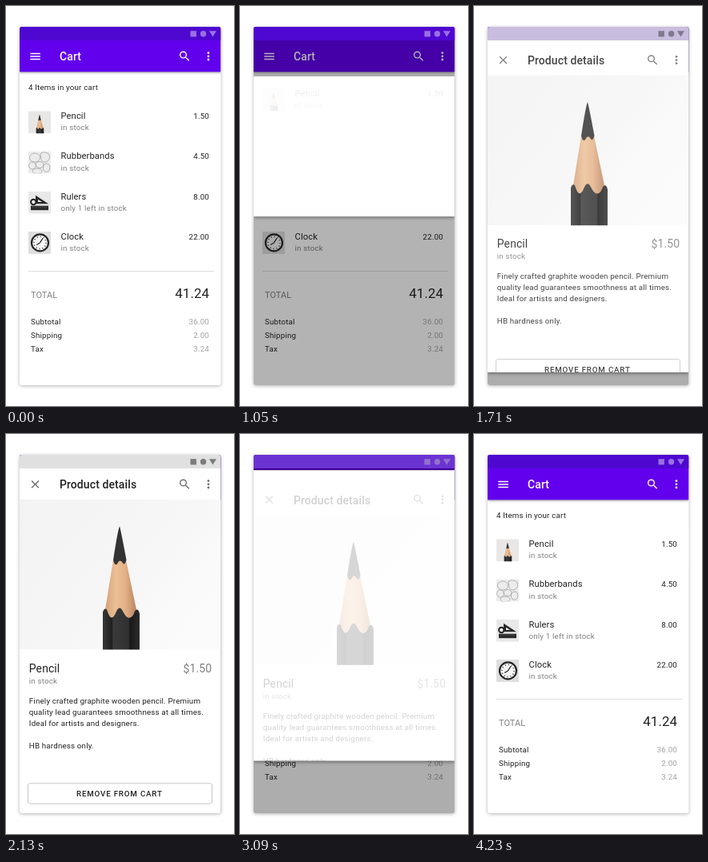
Animation, 285 px wide and 500 px high, one loop 4860 ms. Source, as an HTML page:

```html
<!DOCTYPE html>
<html lang="en">
<head>
<meta charset="utf-8">
<title>Cart</title>
<style>
  html, body { margin: 0; width: 100%; height: 100%; overflow: hidden; background: #fff; }
  svg { display: block; width: 285px; height: 500px; }
  text { font: 9.78px Roboto, sans-serif; letter-spacing: .175px; fill: #222; }
  .bar { font-size: 13.97px; font-weight: 500; letter-spacing: .105px; }
  .name { font-size: 11.18px; letter-spacing: .105px; }
  .big { font-size: 13.97px; letter-spacing: .1px; }
  .sum { font-size: 16.9px; letter-spacing: .1px; }
  .total { font-size: 11px; letter-spacing: 0; }
  .button { font-weight: 500; letter-spacing: .8px; }
  .soft { fill: #808080; }
  .pale { fill: #a3a3a3; }
  .white { fill: #fff; }
  .end { text-anchor: end; }
  #card { filter: drop-shadow(0 1.5px 2px rgba(0, 0, 0, .3)); }
  #header { filter: drop-shadow(0 1.5px 1.5px rgba(0, 0, 0, .4)); }
</style>
</head>
<body>
<svg viewBox="0 0 285 500">
  <defs>
    <clipPath id="cardClip"><rect x="17" y="26" width="251.5" height="448" rx="3"/></clipPath>
    <clipPath id="sheetClip"><rect class="sheet" x="17" width="251.5"/></clipPath>
    <clipPath id="thumbClip"><rect width="28" height="28"/></clipPath>
    <linearGradient id="paper" x2="1" y2=".6">
      <stop stop-color="#f3f3f3"/><stop offset=".6" stop-color="#f6f6f6"/><stop offset="1" stop-color="#fbfbfb"/>
    </linearGradient>
    <linearGradient id="wood">
      <stop stop-color="#d6a27a"/><stop offset=".35" stop-color="#ecc096"/>
      <stop offset=".65" stop-color="#e3b086"/><stop offset="1" stop-color="#b98462"/>
    </linearGradient>
    <linearGradient id="paint">
      <stop stop-color="#383838"/><stop offset=".25" stop-color="#1f1f1f"/><stop offset=".28" stop-color="#3a3a3a"/>
      <stop offset=".7" stop-color="#303030"/><stop offset=".74" stop-color="#181818"/><stop offset="1" stop-color="#2c2c2c"/>
    </linearGradient>

    <path id="menu" d="M3 18h18v-2H3zm0-5h18v-2H3zm0-7v2h18V6z"/>
    <path id="close" d="M19 6.41 17.59 5 12 10.59 6.41 5 5 6.41 10.59 12 5 17.59 6.41 19 12 13.41 17.59 19 19 17.59 13.41 12z"/>
    <path id="search" d="M15.5 14h-.79l-.28-.27A6.47 6.47 0 0 0 16 9.5 6.5 6.5 0 1 0 9.5 16c1.61 0 3.09-.59 4.23-1.57l.27.28v.79l5 4.99L20.49 19zm-6 0a4.5 4.5 0 1 1 0-9 4.5 4.5 0 0 1 0 9z"/>
    <g id="more"><circle cx="12" cy="6" r="2"/><circle cx="12" cy="12" r="2"/><circle cx="12" cy="18" r="2"/></g>
    <g id="tools">
      <use href="#search" transform="translate(214.9 54.4) scale(.699)"/>
      <use href="#more" transform="translate(244.6 54.4) scale(.699)"/>
    </g>
    <g id="signals">
      <rect x="230.5" y="31.2" width="7.4" height="7.2"/>
      <circle cx="246.6" cy="34.8" r="3.7"/>
      <path d="M254 31.2h9l-4.5 7.2z"/>
    </g>

    <!-- Pencil with its tip at the origin -->
    <g id="pencil">
      <path fill="url(#wood)" d="M-8 42Q0 34 8 42L21 104V116H-18V104z"/>
      <path fill="#333" d="M0 0Q1 2 8.5 42Q6 50 3.5 45Q0 40-3 47Q-6 50-8 42Q-2 3 0 0z"/>
      <path fill="url(#paint)" d="M-21 154V107Q-19 101-16 104Q-13 114-10 114Q-7 114-4 106Q0 98 4 106Q9 116 13 114Q17 113 19 106Q23 101 25 109V154z"/>
    </g>

    <g id="pencilThumb">
      <rect width="28" height="28" fill="#e9e7e5"/>
      <use href="#pencil" transform="translate(14 4.5) scale(.21 .158)"/>
    </g>
    <g id="bandsThumb">
      <rect width="28" height="28" fill="#ececec"/>
      <g fill="none" stroke="#a2a2a2" stroke-width=".8">
        <ellipse cx="8" cy="8" rx="6.5" ry="5.5"/>
        <path d="M15 3Q20-1 26 4Q28 10 23 13Q18 15 16 10z"/>
        <circle cx="5" cy="18" r="4.5"/>
        <ellipse cx="14" cy="17" rx="5" ry="4"/>
        <path d="M19 17Q26 13 27 20Q26 28 20 25Q17 22 19 17z"/>
        <ellipse cx="11" cy="25" rx="6" ry="3.5"/>
      </g>
    </g>
    <g id="rulersThumb">
      <rect width="28" height="28" fill="#e8e8e8"/>
      <path fill="#262626" fill-rule="evenodd" d="M9 5L25 15.5H9zM12 10V13.3H17.2z"/>
      <rect x="3" y="18" width="22" height="5.5" fill="#2b2b2b"/>
      <circle cx="6.3" cy="13.3" r="3.2" fill="#e8e8e8" stroke="#222" stroke-width="2"/>
      <path d="M5 19.5h18" stroke="#888" stroke-width=".7" stroke-dasharray=".7 1"/>
    </g>
    <g id="clockThumb">
      <rect width="28" height="28" fill="#dedede"/>
      <circle cx="14.5" cy="14" r="10.5" fill="#f4f4f4" stroke="#262626" stroke-width="2.2"/>
      <circle cx="14.5" cy="14" r="7.6" fill="none" stroke="#333" stroke-width="1.8" stroke-dasharray=".9 3.08"/>
      <path d="M14.5 14L18 8.3M14.5 14L10.2 16.6" stroke="#222" stroke-width="1.2"/>
    </g>
  </defs>

  <g id="card">
    <rect x="17" y="26" width="251.5" height="448" rx="3" fill="#fff"/>
  </g>
  <g clip-path="url(#cardClip)">
    <g id="list">
      <rect id="header" x="17" y="26" width="251.5" height="56.3" fill="#6200ee"/>
      <g class="white">
        <use href="#menu" transform="translate(28.2 54.6) scale(.699)"/>
        <use href="#tools"/>
      </g>
      <text class="bar white" x="67" y="68.4">Cart</text>
      <text x="28" y="104.7">4 Items in your cart</text>
      <g id="rows"></g>
      <path d="M28 331.5H260" stroke="#dcdcdc"/>
      <text class="total soft" x="31" y="364.6">TOTAL</text>
      <text class="sum end" x="254.2" y="364.8">41.24</text>
      <g id="costs"></g>
    </g>
    <rect id="scrim" x="17" y="26" width="251.5" height="448" opacity="0"/>

    <rect id="panel" class="sheet" x="17" width="251.5" fill="#fff"/>
    <g clip-path="url(#sheetClip)">
      <g id="item"></g>
      <g id="detail" opacity="0">
        <g fill="#6c6c6c">
          <use href="#close" transform="translate(28.1 54.5) scale(.699)"/>
          <use href="#tools"/>
        </g>
        <text class="bar" x="67" y="68.4">Product details</text>
        <rect x="17" y="82" width="251.5" height="187.3" fill="url(#paper)"/>
        <use href="#pencil" transform="translate(142 115.5)"/>
        <text class="big" x="28.8" y="297.6">Pencil</text>
        <text class="big soft end" x="257.2" y="297.6">$1.50</text>
        <text class="soft" x="28.8" y="311.6">in stock</text>
        <g id="story"></g>
        <rect x="27.5" y="436.8" width="230" height="25.4" rx="2.5" fill="#fff" stroke="#c6c6c6"/>
        <text class="button" x="88" y="453.3">REMOVE FROM CART</text>
      </g>
    </g>

    <rect x="17" y="26" width="251.5" height="17" fill="#4f08d0"/>
    <use href="#signals" fill="#fff" opacity=".42"/>
    <g id="status" opacity="0">
      <rect x="17" y="26" width="251.5" height="17" fill="#e0e0e0"/>
      <use href="#signals" fill="#7b7b7b"/>
    </g>
  </g>
</svg>
<script>
const $ = id => document.getElementById(id);
const label = (x, y, s, cls = '') => `<text class="${cls}" x="${x}" y="${y}">${s}</text>`;

const items = [
  ['Pencil', 'in stock', '1.50', 'pencil'],
  ['Rubberbands', 'in stock', '4.50', 'bands'],
  ['Rulers', 'only 1 left in stock', '8.00', 'rulers'],
  ['Clock', 'in stock', '22.00', 'clock']
];
const row = ([name, stock, price, art], i) => {
  const y = 116 + i * 50.2;
  return `<g transform="translate(28 ${y + 15.3})" clip-path="url(#thumbClip)"><use href="#${art}Thumb"/></g>` +
    label(68.5, y + 25.2, name, 'name') +
    label(68.5, y + 39.3, stock, 'soft') +
    label(254, y + 25.2, price, 'end');
};
$('rows').innerHTML = items.map(row).join('');
$('item').innerHTML = row(items[0], 0);

$('costs').innerHTML = [['Subtotal', '36.00'], ['Shipping', '2.00'], ['Tax', '3.24']]
  .map(([name, cost], i) => label(31, 398.2 + i * 16.8, name) + label(254, 398.2 + i * 16.8, cost, 'end pale'))
  .join('');

$('story').innerHTML = [
  'Finely crafted graphite wooden pencil. Premium',
  'quality lead guarantees smoothness at all times.',
  'Ideal for artists and designers.',
  '',
  'HB hardness only.'
].map((s, i) => label(28.8, 336.7 + i * 14, s)).join('');

const LOOP = 4860, STEP = 30, OPEN = 630, CLOSE = 2730, SPAN = 1500;
const ROW = { top: 116, bottom: 167 }, PAGE = { top: 26, bottom: 474 };
const clamp = v => Math.min(1, Math.max(0, v));
const mix = (a, b, p) => a + (b - a) * p;

// cubic-bezier(.4, 0, .2, 1)
function ease(x) {
  let lo = 0, hi = 1, s = .5;
  for (let i = 0; i < 24; i++) {
    s = (lo + hi) / 2;
    const r = 1 - s;
    if (1.2 * r * r * s + .6 * r * s * s + s ** 3 < x) lo = s; else hi = s;
  }
  return s * s * (3 - 2 * s);
}

const sheets = document.querySelectorAll('.sheet');

function draw(t) {
  const opening = t < CLOSE;
  const u = clamp((t - (opening ? OPEN : CLOSE)) / SPAN);
  const p = u === 0 || u === 1 ? +(opening === (u === 1)) : opening ? ease(u) : 1 - ease(u);
  const leave = clamp(1 - u / .3), enter = clamp((u - .3) / .7);
  const page = opening ? 1 - (1 - enter) ** 2 : leave;
  const shade = opening ? 1 - leave : 1 - enter;
  const top = mix(ROW.top, PAGE.top, p), bottom = mix(ROW.bottom, PAGE.bottom, p);

  for (const r of sheets) {
    r.setAttribute('y', top);
    r.setAttribute('height', bottom - top);
  }
  $('panel').style.filter = `drop-shadow(0 1px 2px rgba(0, 0, 0, ${.5 * shade}))`;
  $('scrim').setAttribute('opacity', .32 * shade);
  $('item').setAttribute('opacity', opening ? leave : enter);
  $('item').setAttribute('transform', `translate(0 ${top - ROW.top})`);
  $('detail').setAttribute('opacity', page);
  $('detail').setAttribute('transform', `translate(0 ${top - PAGE.top})`);
  $('status').setAttribute('opacity', page);
}

const start = performance.now();
function tick() {
  const t = (performance.now() - start) % LOOP;
  draw(Math.floor(t / STEP) * STEP);
  requestAnimationFrame(tick);
}
tick();
</script>
</body>
</html>
```
